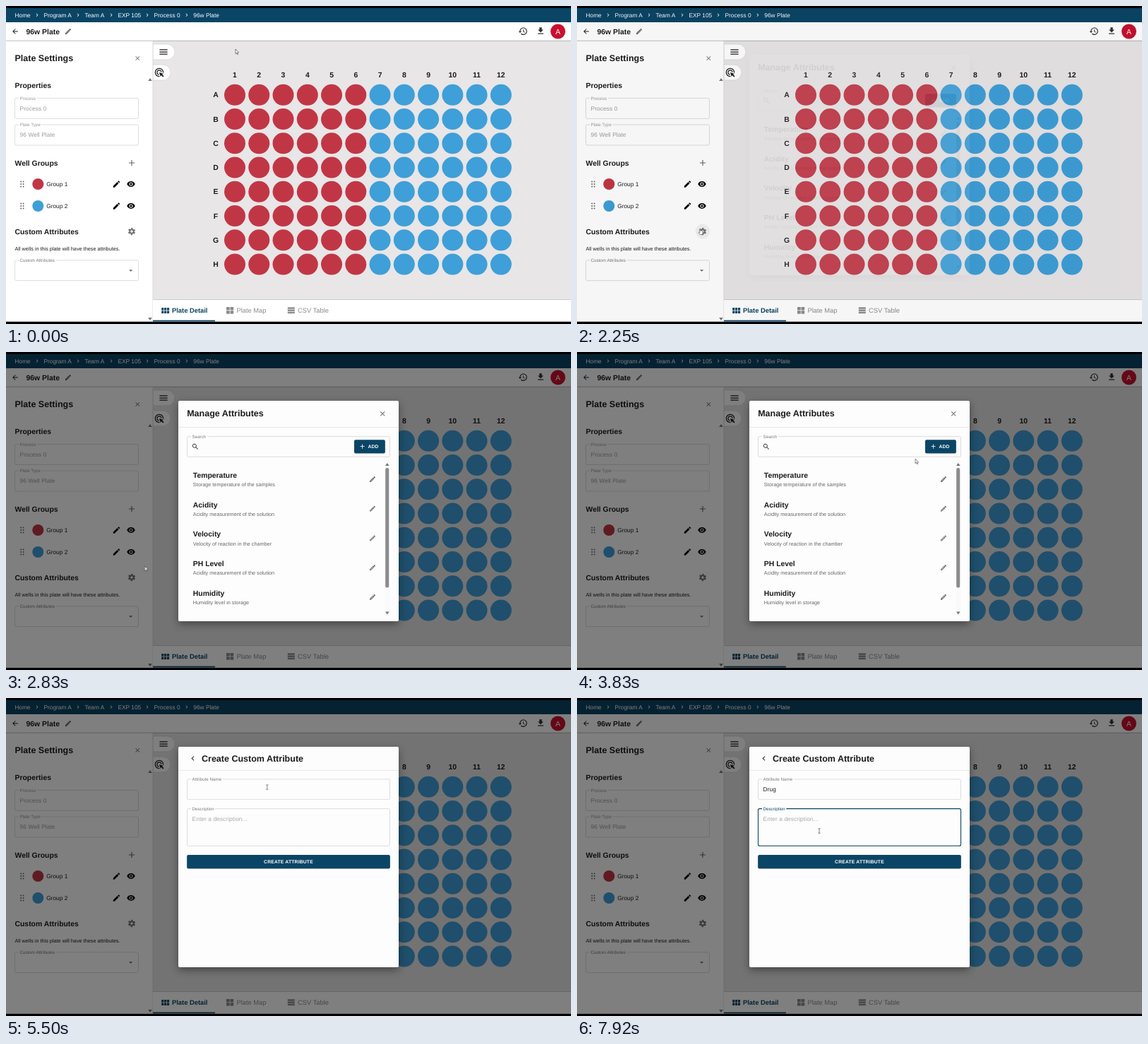
An HTML page for the animation above (8 s loop, 800x450 px).

```html
<!DOCTYPE html>
<html lang="en">
<head>
<meta charset="utf-8">
<title>Plate settings</title>
<style>
html, body { margin: 0; width: 100%; height: 100%; overflow: hidden; background: #000; }
svg { display: block; width: 100vw; height: 100vh; font-family: "Liberation Sans", Arial, sans-serif; text-rendering: geometricPrecision; }
.step { animation: 8s step-end infinite; }

.fade { animation: fade 8s infinite; }
@keyframes fade {
  0% { opacity: 0; }
  27.7% { opacity: 0; animation-timing-function: cubic-bezier(.4, 0, .2, 1); }
  30.5%, 100% { opacity: 1; }
}

.manage { animation-name: manage; }
@keyframes manage { 0% { opacity: 1; } 62.5%, 100% { opacity: 0; } }
.create { animation-name: create; }
@keyframes create { 0% { opacity: 0; } 62.5%, 100% { opacity: 1; } }

.gear-hover { animation-name: gear-hover; }
@keyframes gear-hover { 0% { opacity: 0; } 22% { opacity: 1; } 29%, 100% { opacity: 0; } }
.add-hover { animation-name: add-hover; }
@keyframes add-hover { 0% { opacity: 0; } 50% { opacity: 1; } 62.5%, 100% { opacity: 0; } }

.name-focus { animation-name: name-focus; }
@keyframes name-focus { 0% { opacity: 0; } 70.5% { opacity: 1; } 92%, 100% { opacity: 0; } }
.desc-focus { animation-name: desc-focus; }
@keyframes desc-focus { 0% { opacity: 0; } 92%, 100% { opacity: 1; } }

.k0 { animation-name: k0; }
.k1 { animation-name: k1; }
.k2 { animation-name: k2; }
.k3 { animation-name: k3; }
@keyframes k0 { 0% { opacity: 0; } 76%, 100% { opacity: 1; } }
@keyframes k1 { 0% { opacity: 0; } 78%, 100% { opacity: 1; } }
@keyframes k2 { 0% { opacity: 0; } 80%, 100% { opacity: 1; } }
@keyframes k3 { 0% { opacity: 0; } 82%, 100% { opacity: 1; } }

.caret { animation-name: caret; }
@keyframes caret {
  0% { opacity: 0; transform: none; }
  70.5% { opacity: 1; transform: none; }
  76% { opacity: 1; transform: translateX(6.1px); }
  78% { opacity: 1; transform: translateX(9px); }
  80% { opacity: 1; transform: translateX(13.7px); }
  82% { opacity: 1; transform: translateX(18.4px); }
  87.5%, 100% { opacity: 0; transform: translateX(18.4px); }
}

.cursor { animation: move 8s ease-in-out infinite; }
@keyframes move {
  0%, 4% { transform: translate(325px, 61px); }
  17.5%, 19% { transform: translate(165.5px, 332px); }
  22.5%, 30% { transform: translate(174.5px, 315px); }
  35.4%, 37% { transform: translate(196.5px, 303px); }
  51%, 63% { transform: translate(511px, 134px); }
  69.5%, 85% { transform: translate(366px, 126px); }
  91%, 100% { transform: translate(343px, 188px); }
}
.arrow { animation-name: arrow; }
@keyframes arrow { 0% { opacity: 1; } 22% { opacity: 0; } 29% { opacity: 1; } 50%, 100% { opacity: 0; } }
.hand { animation-name: hand; }
@keyframes hand { 0% { opacity: 0; } 22% { opacity: 1; } 29% { opacity: 0; } 50% { opacity: 1; } 62.5%, 100% { opacity: 0; } }
</style>
</head>
<body>
<svg id="stage" viewBox="0 0 800 450" preserveAspectRatio="none"></svg>
<script>
const NAVY = '#0b4565', RED = '#c13645', BLUE = '#3f9fd8', INK = '#1c1c1c', GREY = '#8c8c8c';

// Icons on a 24-unit grid
const icons = {
  back: 'M20 11H7.83l5.59-5.59L12 4l-8 8 8 8 1.41-1.41L7.83 13H20z',
  edit: 'M3 17.25V21h3.75L17.81 9.94l-3.75-3.75zM20.71 7.04c.39-.39.39-1.02 0-1.41l-2.34-2.34c-.39-.39-1.02-.39-1.41 0l-1.83 1.83 3.75 3.75z',
  editLine: 'm14.06 9.02.92.92L5.92 19H5v-.92zM17.66 3c-.25 0-.51.1-.7.29l-1.83 1.83 3.75 3.75 1.83-1.83c.39-.39.39-1.02 0-1.41l-2.34-2.34c-.2-.2-.45-.29-.71-.29m-3.6 3.19L3 17.25V21h3.75L17.81 9.94z',
  eye: 'M12 4.5C7 4.5 2.73 7.61 1 12c1.73 4.39 6 7.5 11 7.5s9.27-3.11 11-7.5c-1.73-4.39-6-7.5-11-7.5M12 17c-2.76 0-5-2.24-5-5s2.24-5 5-5 5 2.24 5 5-2.24 5-5 5m0-8c-1.66 0-3 1.34-3 3s1.34 3 3 3 3-1.34 3-3-1.34-3-3-3',
  history: 'M13 3c-4.97 0-9 4.03-9 9H1l3.89 3.89.07.14L9 12H6c0-3.87 3.13-7 7-7s7 3.13 7 7-3.13 7-7 7c-1.93 0-3.68-.79-4.94-2.06l-1.42 1.42C8.27 19.99 10.51 21 13 21c4.97 0 9-4.03 9-9s-4.03-9-9-9m-1 5v5l4.28 2.54.72-1.21-3.5-2.08V8z',
  download: 'M5 20h14v-2H5zM19 9h-4V3H9v6H5l7 7z',
  target: 'M11.71 17.99C8.53 17.84 6 15.22 6 12c0-3.31 2.69-6 6-6 3.22 0 5.84 2.53 5.99 5.71l-2.1-.63C15.48 9.31 13.89 8 12 8c-2.21 0-4 1.79-4 4 0 1.89 1.31 3.48 3.08 3.89zM22 12c0 .3-.01.6-.04.9l-1.97-.59c.01-.1.01-.21.01-.31 0-4.42-3.58-8-8-8s-8 3.58-8 8 3.58 8 8 8c.1 0 .21 0 .31-.01l.59 1.97c-.3.03-.6.04-.9.04-5.52 0-10-4.48-10-10S6.48 2 12 2s10 4.48 10 10m-3.77 4.26L22 15l-10-3 3 10 1.26-3.77 4.27 4.27 1.98-1.98z',
  close: 'm5 6.4 1.4-1.4L12 10.6 17.6 5 19 6.4 13.4 12l5.6 5.6-1.4 1.4-5.6-5.6L6.4 19 5 17.6l5.6-5.6z',
  plus: 'M19 13h-6v6h-2v-6H5v-2h6V5h2v6h6z',
  menu: 'M3 18h18v-2H3zm0-5h18v-2H3zm0-7v2h18V6z',
  right: 'M8.6 16.6 13.2 12 8.6 7.4 10 6l6 6-6 6z',
  left: 'M15.4 7.4 14 6l-6 6 6 6 1.4-1.4L10.8 12z',
  down: 'm7 10 5 5 5-5z',
  search: 'M9.5 3a6.5 6.5 0 1 0 4 11.6l5.9 5.9 1.5-1.5-5.9-5.9A6.5 6.5 0 0 0 9.5 3m0 2a4.5 4.5 0 1 1 0 9 4.5 4.5 0 0 1 0-9'
};

const times = (n, draw) => Array.from({ length: n }, (_, i) => draw(i)).join('');
const box = (x, y, w, h, fill, extra = '') => `<rect x="${x}" y="${y}" width="${w}" height="${h}" fill="${fill}" ${extra}/>`;
const disc = (x, y, r, fill) => `<circle cx="${x}" cy="${y}" r="${r}" fill="${fill}"/>`;
const text = (x, y, size, value, fill = INK, extra = '') => `<text x="${x}" y="${y}" font-size="${size}" fill="${fill}" ${extra}>${value}</text>`;
const bold = (x, y, size, value, fill = INK, extra = '') => text(x, y, size, value, fill, `font-weight="700" ${extra}`);
const icon = (name, x, y, size, fill = INK) =>
  `<path d="${icons[name]}" fill="${fill}" transform="translate(${x - size / 2} ${y - size / 2}) scale(${size / 24})"/>`;
const arrowHead = (x, y, dir) => `<path d="M${x - 2.8} ${y + dir * 2}h5.6l-2.8 ${-dir * 4}z" fill="#777"/>`;
const step = (name, body) => `<g class="step ${name}">${body}</g>`;

function field(x, y, w, h, label, color = '#777', line = '#c6c6c6', weight = .6) {
  return box(x, y, w, h, 'none', `rx="2" stroke="${line}" stroke-width="${weight}"`) +
    text(x + 7, y + 2.3, 6.25, label, color, 'stroke="#fff" stroke-width="4" paint-order="stroke"');
}

function gear(x, y, color) {
  return `<g transform="translate(${x} ${y}) scale(.52)" fill="none" stroke="${color}">
    <circle r="5.3" stroke-width="3.8"/>
    <circle r="8.1" stroke-width="3.6" pathLength="6" stroke-dasharray=".5 .5" stroke-dashoffset="-.25"/></g>`;
}

function button(x, y, w, h, fill) {
  return box(x, y + .8, w, h, '#000', 'rx="2" opacity=".25"') + box(x, y, w, h, fill, 'rx="2"');
}

function header() {
  const crumbs = [['Home', 12.5], ['Program A', 53.5], ['Team A', 111.5], ['EXP 105', 158.5], ['Process 0', 209.5], ['96w Plate', 265.3]];
  return box(0, 3, 800, 20, NAVY) +
    crumbs.map(([name, x], i) => text(x, 15.6, 8.33, name, '#fff') + (i ? icon('right', x - 9.5, 12.8, 9, '#fff') : '')).join('') +
    box(0, 23, 800, 26, '#fff') + box(0, 48.6, 800, .6, '#d4d4d4') +
    icon('back', 13, 36, 11.5) + bold(28.5, 39.6, 10.42, '96w Plate') + icon('editLine', 88, 36, 10.4, '#444') +
    icon('history', 732, 35.7, 14, '#333') + icon('download', 757, 35.2, 13.5, '#333') +
    disc(781.5, 36, 10.5, '#c8102e') + text(781.5, 39.6, 10.42, 'A', '#fff', 'text-anchor="middle"');
}

function group(y, name, color) {
  return times(6, i => disc(21.2 + (i % 2) * 3.4, y - 3.4 + (i >> 1) * 3.4, 1, '#6a6a6a')) +
    disc(45.3, y, 8, color) + text(57.2, y + 3, 8.33, name) +
    icon('edit', 156.5, y, 12.5, '#000') + icon('eye', 177, y, 12.5, '#000');
}

function sidebar() {
  return box(0, 49.2, 208, 397.5, '#fff') + box(207.6, 49, .7, 397.5, '#cfcfcf') +
    bold(12.5, 78, 12.5, 'Plate Settings') + icon('close', 186.3, 74, 10.4, '#666') +
    bold(12.5, 115.6, 10.42, 'Properties') +
    field(12.5, 130.4, 175, 29, 'Process', '#999') + text(19.6, 147.7, 8.33, 'Process 0', '#9b9b9b', 'letter-spacing=".08"') +
    field(12.5, 168, 175, 29, 'Plate Type', '#999') + text(19.6, 185.2, 8.33, '96 Well Plate', '#9b9b9b', 'letter-spacing=".08"') +
    bold(12.5, 225.8, 10.42, 'Well Groups') + icon('plus', 178, 222, 14, '#666') +
    group(252, 'Group 1', RED) + group(283, 'Group 2', BLUE) +
    bold(12.5, 322.7, 10.42, 'Custom Attributes') +
    step('gear-hover', disc(178, 319, 10.4, '#f2f2f2')) + gear(178, 319, '#707070') +
    text(12.5, 346.2, 7.29, 'All wells in this plate will have these attributes.') +
    field(12.5, 359.8, 175, 28.8, 'Custom Attributes') + icon('down', 176.6, 374.2, 12.5, '#666') +
    arrowHead(204, 104, 1) + arrowHead(204, 443, -1);
}

function plate() {
  const pitch = 34.26, x0 = 324, y0 = 125.8;
  const tab = (y, end) => `<path d="M208 ${y}h${end - 219}a11 11 0 0 1 0 22H208z" fill="#fff" stroke="#cfcfcf" stroke-width=".6"/>`;
  return box(208, 49.2, 592, 366, '#e8e6e7') +
    times(12, c => bold(x0 + c * pitch, 101, 10.42, c + 1, INK, 'text-anchor="middle"')) +
    times(8, r => bold(297, y0 + r * pitch + 3.6, 10.42, 'ABCDEFGH'[r], INK, 'text-anchor="middle"')) +
    times(96, i => disc(x0 + (i % 12) * pitch, y0 + Math.floor(i / 12) * pitch, 15, i % 12 < 6 ? RED : BLUE)) +
    tab(54, 239) + icon('menu', 223, 65, 15) + tab(83, 233) + icon('target', 217, 94, 15);
}

function tabs() {
  const cells = (x, y, cols, rows, w, h, fill) =>
    times(cols * rows, i => box(x + (i % cols) * (w + .8), y + Math.floor(i / cols) * (h + .8), w, h, fill));
  return box(208, 415.3, 592, 31.4, '#fff') + box(208, 415, 592, .7, '#d2d2d2') +
    cells(220.2, 427, 3, 2, 3.1, 3.6, NAVY) + bold(235, 434, 9.37, 'Plate Detail', NAVY) +
    cells(312, 426, 2, 2, 4.7, 4.4, GREY) + text(326.4, 434, 9.37, 'Plate Map', GREY) +
    cells(398.8, 426.3, 1, 3, 10, 2.4, GREY) + text(413, 434, 9.37, 'CSV Table', GREY) +
    box(208, 444.6, 88, 1.8, NAVY);
}

function manageView() {
  const rows = [
    ['Temperature', 'Storage temperature of the samples'],
    ['Acidity', 'Acidity measurement of the solution'],
    ['Velocity', 'Velocity of reaction in the chamber'],
    ['PH Level', 'Acidity measurement of the solution'],
    ['Humidity', 'Humidity level in storage']
  ];
  const add = fill => button(493, 124.2, 43.8, 19, fill) + icon('plus', 504.6, 133.6, 10.4, '#fff') +
    bold(512.4, 136.1, 6.77, 'ADD', '#fff', 'letter-spacing=".19"');
  return bold(256.2, 91.2, 12.5, 'Manage Attributes') + icon('close', 533.2, 87.4, 11.5, '#666') +
    box(244, 106, 312, .6, '#dcdcdc') +
    field(256.5, 119.6, 287, 28.8, 'Search') +
    step('add-hover', field(256.5, 119.6, 287, 28.8, 'Search', '#666', '#222')) +
    icon('search', 268, 134, 11, '#444') + add(NAVY) + step('add-hover', add('#08304a')) +
    rows.map(([name, note], i) => {
      const y = 41.7 * i;
      return bold(264.8, 178 + y, 10.42, name) + text(264.8, 190.1 + y, 7.29, note, '#666') + icon('editLine', 519, 180 + y, 10.4, '#555');
    }).join('') +
    box(536, 155, 7.5, 219, '#fafafa') + box(537.2, 164, 5, 169.5, '#8b8b8b', 'rx="2.5"') +
    arrowHead(539.8, 159, 1) + arrowHead(539.8, 369.5, -1);
}

function createView() {
  const name = (...style) => field(256.5, 114.9, 287, 28.8, 'Attribute Name', ...style);
  const desc = (...style) => field(256.5, 156.6, 287, 52.6, 'Description', ...style);
  const typed = [['D', 0], ['r', 6.1], ['u', 9], ['g', 13.7]];
  return icon('left', 264.6, 85.5, 13, '#333') + bold(277, 89.7, 12.5, 'Create Custom Attribute') +
    box(244, 102.2, 312, .6, '#dcdcdc') +
    name() + step('name-focus', name(NAVY, NAVY, 1.1)) +
    typed.map(([letter, dx], i) => step('k' + i, text(263.6 + dx, 132, 8.33, letter))).join('') +
    step('caret', box(263.6, 124.6, .6, 9, '#111')) +
    desc() + step('desc-focus', desc(NAVY, NAVY, 1.1)) +
    text(263.6, 173.8, 8.33, 'Enter a description...', '#a8a8a8', 'letter-spacing=".08"') +
    button(256.2, 222, 287.6, 19.2, NAVY) +
    bold(400, 234, 6.77, 'CREATE ATTRIBUTE', '#fff', 'text-anchor="middle" letter-spacing=".19"');
}

function dialog() {
  return `<g class="fade">${box(0, 3, 800, 443.7, '#000', 'opacity=".5"')}</g><g class="fade">` +
    box(244, 69, 312, 312, '#fdfdfd', 'rx="2" style="filter:drop-shadow(0 4px 6px #0006)"') +
    step('manage', manageView()) + step('create', createView()) + '</g>';
}

function cursor() {
  const style = 'fill="#fff" stroke="#333" stroke-width=".6" stroke-linejoin="round"';
  return '<g class="cursor">' +
    step('arrow', `<path d="M0 0v6.6l1.5-1.3 1 2.3 1-.4-1-2.3h2z" ${style}/>`) +
    step('hand', `<path d="M-.7 4.5V.6q.7-1 1.4 0v2.2l2.6.7q.7.3.6 1l-.5 2.6-.6 1.5H-.2l-2.2-3q.3-1.1 1.7 0z" ${style}/>`) +
    step('create', '<path d="M-1.5-3.3h1q.5 0 .5.5v5.6q0 .5-.5.5h-1M1.5-3.3h-1Q0-3.3 0-2.8M1.5 3.3h-1Q0 3.3 0 2.8" fill="none" stroke="#444" stroke-width=".7"/>') +
    '</g>';
}

document.getElementById('stage').innerHTML =
  box(0, 0, 800, 450, '#000') + plate() + sidebar() + header() + tabs() + dialog() + cursor();
</script>
</body>
</html>
```
